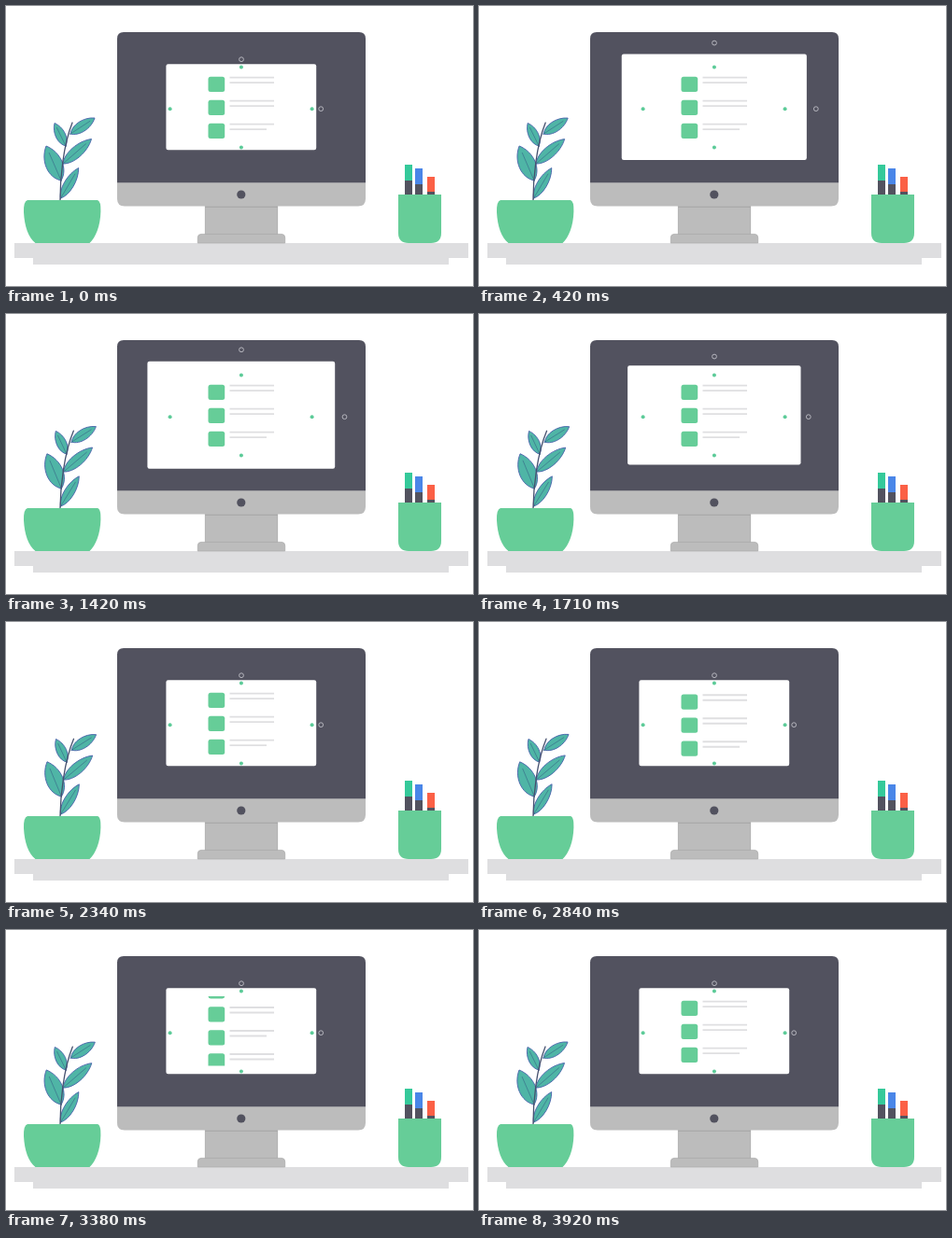
An HTML page for the animation above (3.96 s loop, 500 px wide and 300 px high).

```html
<!DOCTYPE html>
<html lang="en">
<head>
<meta charset="utf-8">
<title>Desk</title>
<style>
html, body { margin: 0; width: 100%; height: 100%; overflow: hidden; background: #fff; }
svg { display: block; width: 500px; height: 300px; }
</style>
</head>
<body>
<svg viewBox="0 0 500 300">
  <defs>
    <clipPath id="listArea"><rect x="210" y="71" width="82" height="74.5"/></clipPath>
    <g id="row">
      <rect x="216.5" y="75.8" width="17.7" height="16.2" rx="2.5" fill="#66cd98"/>
      <path d="M239.5 76.6H287" stroke="#dfdfe1" stroke-width="1.8"/>
    </g>
  </defs>

  <!-- desk -->
  <path d="M9 254H495V270H474V277H29V270H9Z" fill="#dedee0"/>

  <!-- monitor -->
  <rect x="213" y="214" width="78" height="31" fill="#bcbcbc"/>
  <path d="M213 215.2H291" stroke="#aaa" stroke-width="1.4"/>
  <path d="M213.3 214V245M290.7 214V245" stroke="#adadad" stroke-width=".6"/>
  <path d="M205.3 254V248Q205.3 244.4 209 244.4H295Q298.7 244.4 298.7 248V254Z" fill="#bcbcbc" stroke="#a9a9a9" stroke-width=".7"/>
  <path d="M119 189H385V206.5Q385 214.5 377 214.5H127Q119 214.5 119 206.5Z" fill="#bcbcbc"/>
  <path d="M119 189.3V35Q119 28 126 28H378Q385 28 385 35V189.3Z" fill="#52525f"/>
  <circle cx="251.8" cy="202" r="4.6" fill="#52525f"/>

  <!-- resizable window -->
  <rect id="pane" rx="2.2" fill="#fff"/>
  <g fill="none" stroke="#b5b5bd" stroke-width="1">
    <circle id="topGrip" cx="252" r="2.4"/>
    <circle id="sideGrip" cy="110.2" r="2.4"/>
  </g>
  <g fill="#5ccb98">
    <circle cx="251.9" cy="65.5" r="2"/>
    <circle cx="251.9" cy="151.5" r="2"/>
    <circle cx="175.6" cy="110.2" r="2"/>
    <circle cx="327.6" cy="110.2" r="2"/>
  </g>
  <g clip-path="url(#listArea)"><g id="list"></g></g>

  <!-- plant -->
  <g id="plant" stroke-linecap="round"></g>
  <path d="M23 208H98Q101.7 209 101.4 220C101 236 96 248 89.5 254H31.5C24 248 19.8 236 19 221Q18.7 209 23 208Z" fill="#66cd98"/>

  <!-- pens and cup -->
  <path d="M427 186H435V203H427ZM438 190H446V203H438ZM451 198H459V203H451Z" fill="#52525f"/>
  <rect x="427" y="170" width="8" height="17" fill="#35c99a"/>
  <rect x="438" y="174" width="8" height="17" fill="#4a86e8"/>
  <rect x="451" y="183" width="8" height="16" fill="#fb6046"/>
  <path d="M420 202H466V243Q466 254 455 254H431Q420 254 420 243Z" fill="#66cd98"/>
</svg>
<script>
const LOOP = 3960, PITCH = 25, ROWS = 3;
const el = id => document.getElementById(id);
const mix = (a, b, k) => a + (b - a) * k;
const ease = (t, from, to) => {
  const p = Math.min(1, Math.max(0, (t - from) / (to - from)));
  return p * p * (3 - 2 * p);
};
const set = (id, attrs) => {
  for (const name in attrs) el(id).setAttribute(name, attrs[name]);
};

// Two copies of the rows, so the list can wrap around while scrolling.
let rows = '';
for (let i = -ROWS; i < ROWS; i++) {
  const end = (i + ROWS) % ROWS === 2 ? 279 : 287;
  rows += `<g transform="translate(0 ${i * PITCH})"><use href="#row"/>
    <path d="M239.5 82.1H${end}" stroke="#dfdfe1" stroke-width="1.8"/></g>`;
}
el('list').innerHTML = rows;

// A leaf from its base to its tip, bulging by w on both sides of the vein.
function leaf(x, y, tipX, tipY, w) {
  const dx = tipX - x, dy = tipY - y, len = Math.hypot(dx, dy);
  const at = (k, side) =>
    `${x + dx * k - dy / len * w * side} ${y + dy * k + dx / len * w * side}`;
  return `<path d="M${x} ${y}C${at(.2, 1)} ${at(.7, 1)} ${tipX} ${tipY}
    C${at(.7, -1)} ${at(.2, -1)} ${x} ${y}Z" fill="#4fb5a6" stroke="#4a62ac" stroke-width=".9"/>
    <path d="M${x} ${y}L${x + dx * .8} ${y + dy * .8}" stroke="#3f7f91" stroke-width=".9"/>`;
}
el('plant').innerHTML =
  leaf(69, 137, 95, 120, 7.5) +
  leaf(64, 150, 52, 125.5, 7) +
  leaf(61, 169, 91.5, 142.5, 8) +
  leaf(59, 187, 43, 150, 12) +
  leaf(58.5, 206, 77.7, 173.5, 7) +
  '<path d="M58 208C58 185 61 150 71 125" fill="none" stroke="#46506f" stroke-width="1.3"/>';

function draw(now) {
  const t = now % LOOP;
  const grow = ease(t, 0, 500) - ease(t, 1500, 2000);
  const left = mix(171.4, 151.4, grow), right = mix(332.2, 352.2, grow);
  const top = mix(62.3, 50.8, grow), bottom = mix(154.3, 165.8, grow);
  set('pane', { x: left, y: top, width: right - left, height: bottom - top });
  set('topGrip', { cy: mix(57.2, 38.3, grow) });
  set('sideGrip', { cx: mix(337.2, 362.5, grow) });

  const scroll = ROWS * PITCH * ease(t, 2760, 3680);
  set('list', { transform: `translate(0 ${scroll})` });

  const sway = (1 - Math.cos(2 * Math.PI * t / LOOP)) / 2;
  set('plant', { transform: `rotate(${1.1 * sway} 58 208)` });
}

const start = performance.now();
function tick() {
  draw(performance.now() - start);
  requestAnimationFrame(tick);
}
tick();
</script>
</body>
</html>
```
